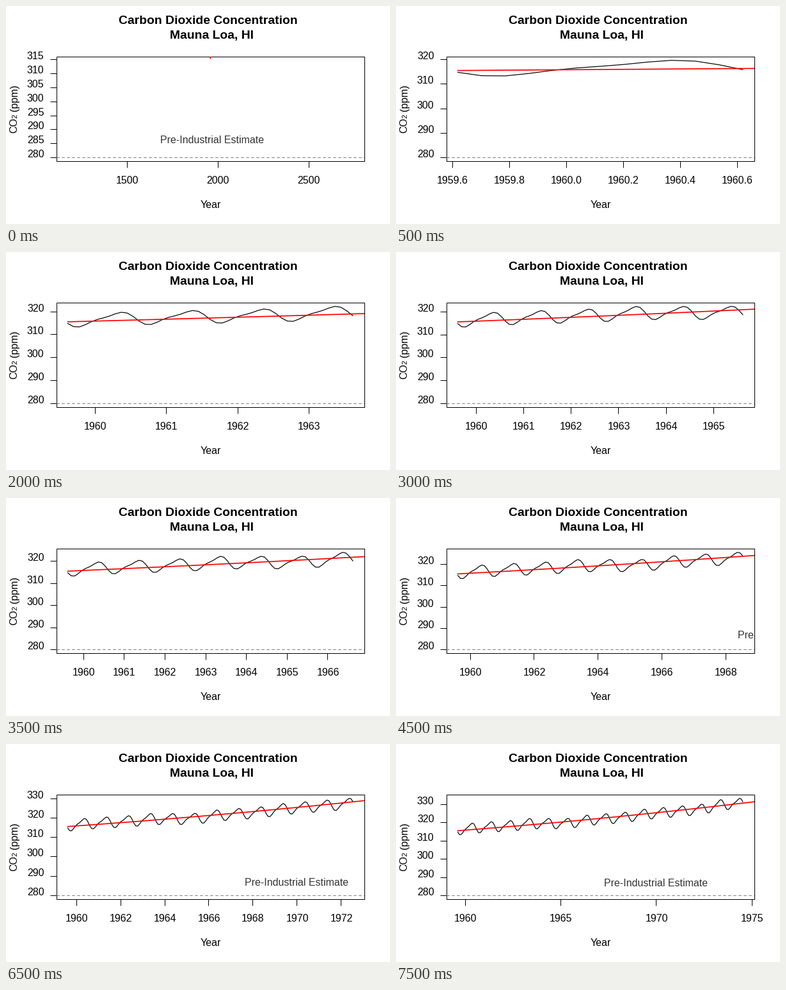
A matplotlib script that plays this animation: 600x340 px, repeating every 8000 ms.

```python
import math

import numpy as np
import matplotlib.pyplot as plt
from matplotlib.animation import FuncAnimation
from matplotlib.transforms import Bbox

W, H, DPI = 600, 340, 100
PT = 72 / DPI                     # points per pixel
LEFT, RIGHT, TOP, BOTTOM = 78.72, 559.68, 78.72, 242.08
LINE = 19.2                       # height of one margin line
PAD = 0.04                        # the data range is padded on both sides
START, BASE = 1959.62, 280        # August 1959, pre-industrial level
STEPS = 16
SHORT = {9, 13, 15}               # steps that stop one month early

# Deseasonalised level: years since the start, ppm
LEVEL_T = [0, 1, 3, 3.75, 5.75, 6.75, 8.75, 9.75, 12.75, 13.75, 15]
LEVEL_PPM = [316.0, 317.1, 318.4, 319.4, 319.45, 321.2,
             322.8, 324.5, 327.2, 329.7, 330.6]


def reading(t):
    """Level plus a yearly swing with a slow rise and a quick fall."""
    a = 2 * np.pi * t
    swing = -2.58 * np.sin(a + 0.377) - 0.75 * np.sin(2 * a + 0.497)
    return np.interp(t, LEVEL_T, LEVEL_PPM) + swing


def trend(t):
    return 315.44 + 0.797 * t + 0.0145 * t * t


def nice_step(span):
    cell = span / 5
    base = 10 ** math.floor(math.log10(cell))
    step = base
    for factor, bias in ((2, 0.8), (5, 1.7), (10, 0.8)):
        if factor * base - cell >= bias * (cell - step):
            break
        step = factor * base
    return step


class Scale:
    """Maps a padded data range onto a pixel range."""

    def __init__(self, lo, hi, start, end):
        pad = PAD * (hi - lo)
        self.lo, self.hi = lo - pad, hi + pad
        self.start, self.end = start, end
        self.step = nice_step(self.hi - self.lo)

    def __call__(self, v):
        part = (v - self.lo) / (self.hi - self.lo)
        return self.start + part * (self.end - self.start)

    def ticks(self):
        first = math.ceil(self.lo / self.step)
        last = math.floor(self.hi / self.step)
        return [i * self.step for i in range(first, last + 1)]


CLIP = Bbox.from_extents(LEFT, H - BOTTOM, RIGHT, H - TOP)

fig = plt.figure(figsize=(W / DPI, H / DPI), dpi=DPI, facecolor="white")
ax = fig.add_axes([0, 0, 1, 1])


def stroke(xs, ys, color="black", width=1.0, clip=False, **style):
    line, = ax.plot(xs, ys, color=color, lw=width * PT, **style)
    if clip:
        line.set_clip_box(CLIP)


def label(x, y, text, size=16, ha="center", **style):
    return ax.text(x, y, text, fontsize=size * PT, ha=ha, va="baseline",
                   family="Liberation Sans", **style)


def draw_titles():
    mid = (LEFT + RIGHT) / 2
    label(mid - 3, 28, "Carbon Dioxide Concentration", 19.4, weight="bold")
    label(mid + 2.5, 51, "Mauna Loa, HI", 19.4, weight="bold")
    label(mid + 0.7, 315, "Year")
    for y, text, size in ((198.2, "CO", 16), (174.8, "2", 11.5),
                          (163.8, "(ppm)", 16)):
        label(17.6, y, text, size, ha="left", rotation=90,
              rotation_mode="anchor")


def draw_axes(sx, sy):
    stroke([LEFT, RIGHT, RIGHT, LEFT, LEFT], [BOTTOM, BOTTOM, TOP, TOP, BOTTOM],
           solid_joinstyle="miter")
    digits = 1 if sx.step < 1 else 0
    for v in sx.ticks():
        x = sx(v)
        stroke([x, x], [BOTTOM, BOTTOM + LINE / 2], solid_capstyle="butt")
        label(x + 0.6, 276.7, f"{v:.{digits}f}")
    for v in sy.ticks():
        y = sy(v)
        stroke([LEFT - LINE / 2, LEFT], [y, y], solid_capstyle="butt")
        label(LEFT - LINE, y, f"{v:.0f}", ha="right")


def draw(step):
    ax.clear()
    ax.set_xlim(0, W)
    ax.set_ylim(H, 0)
    ax.axis("off")

    last = 12 * step - (step in SHORT)
    t = np.arange(last + 1) / 12
    ppm = reading(t)
    lo, hi = START, START + t[-1]
    if lo == hi:
        lo, hi = 0.6 * lo, 1.4 * hi
    sx = Scale(lo, hi, LEFT, RIGHT)
    sy = Scale(BASE, ppm.max(), BOTTOM, TOP)

    draw_titles()
    draw_axes(sx, sy)
    stroke([LEFT, RIGHT], [sy(BASE)] * 2, "#7f7f7f", linestyle=(0, (4, 4)),
           dash_capstyle="round", clip=True)
    note = label(sx(1970), sy(285), "Pre-Industrial Estimate",
                 color="#333333", clip_on=True)
    note.set_clip_box(CLIP)
    if last:
        stroke(sx(START + t), sy(ppm), width=1.2, clip=True,
               solid_joinstyle="round")
    ahead = np.linspace(0, 20, 241)
    stroke(sx(START + ahead), sy(trend(ahead)), "red", 1.7, clip=True)
    return []


anim = FuncAnimation(fig, draw, frames=STEPS, interval=500, repeat=True,
                     repeat_delay=0, blit=False)
plt.show()
```
